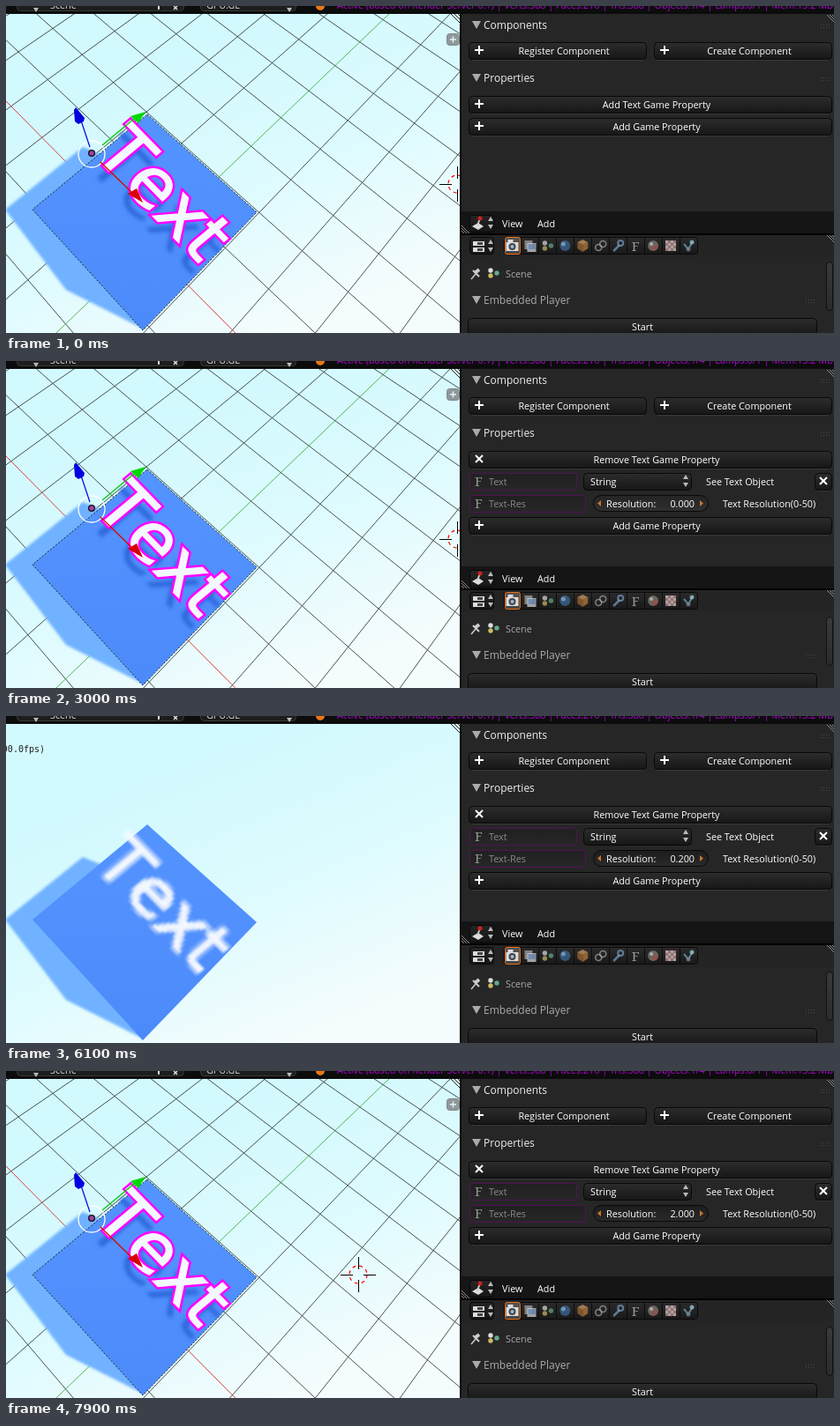
Write an HTML page with a canvas that moves like this. It is 938 by 371 pixels and loops after 8 s.

```html
<!DOCTYPE html>
<html lang="en">
<head>
<meta charset="utf-8">
<title>Text property demo</title>
<style>
html, body { margin: 0; width: 100%; height: 100%; overflow: hidden; background: #111; }
canvas { display: block; }
</style>
</head>
<body>
<canvas id="stage" width="938" height="371"></canvas>
<script>
const ctx = document.getElementById('stage').getContext('2d');
const LOOP = 8000;
const UI = '10.8px "Open Sans", sans-serif';
const TITLE = '12px "Open Sans", sans-serif';
const SERIF = '15px "Noto Serif", serif';
const WORD = 'px "DejaVu Sans", sans-serif';

// Value of the last [time, value] step that has begun.
const stepAt = (steps, t) => steps.reduce((v, [at, next]) => t >= at ? next : v, undefined);

const HOVER = [[0, ''], [400, 'text'], [1200, ''], [2000, 'toggle'], [2700, ''],
  [3000, 'number'], [5500, ''], [7000, 'add'], [7100, 'number'], [7900, '']];
const VALUE = [[0, 0], [3300, 0.1], [3400, 0.3], [3500, 0.6], [3600, 0.9], [3700, 1.1], [3800, 0.8],
  [3900, 0.5], [4000, 0.3], [4100, 0.1], [4200, -0.1], [4300, -0.3], [4500, -0.4], [4700, -0.2],
  [4800, -0.1], [5000, 0.1], [5300, 0.2], [7900, 2]];

// ---------- helpers ----------
function line(color, width, ...p) {
  ctx.strokeStyle = color;
  ctx.lineWidth = width;
  ctx.beginPath();
  for (let i = 0; i < p.length; i += 2) ctx.lineTo(p[i], p[i + 1]);
  ctx.stroke();
}
function poly(color, ...p) {
  ctx.fillStyle = color;
  ctx.beginPath();
  for (let i = 0; i < p.length; i += 2) ctx.lineTo(p[i], p[i + 1]);
  ctx.fill();
}
function rect(color, x, y, w, h) {
  ctx.fillStyle = color;
  ctx.fillRect(x, y, w, h);
}
function disc(color, x, y, r) {
  ctx.fillStyle = color;
  ctx.beginPath();
  ctx.arc(x, y, r, 0, 7);
  ctx.fill();
}
function ring(color, width, x, y, r) {
  ctx.strokeStyle = color;
  ctx.lineWidth = width;
  ctx.beginPath();
  ctx.arc(x, y, r, 0, 7);
  ctx.stroke();
}
function text(s, x, y, color = '#fff', align = 'left', font = UI) {
  ctx.font = font;
  ctx.fillStyle = color;
  ctx.textAlign = align;
  ctx.fillText(s, x, y);
}
function box(x, y, w, h, top, bottom, r = 4, edge = '#080808') {
  const g = ctx.createLinearGradient(0, y, 0, y + h);
  g.addColorStop(0, top);
  g.addColorStop(1, bottom);
  ctx.fillStyle = g;
  ctx.strokeStyle = edge;
  ctx.lineWidth = 1;
  ctx.beginPath();
  ctx.roundRect(x + .5, y + .5, w - 1, h - 1, r);
  ctx.fill();
  ctx.stroke();
}
const plus = (x, y) => { line('#fff', 2, x - 5, y, x + 5, y); line('#fff', 2, x, y - 5, x, y + 5); };
const cross = (x, y) => {
  line('#fff', 2, x - 4, y - 4, x + 4, y + 4);
  line('#fff', 2, x - 4, y + 4, x + 4, y - 4);
};
const arrows = (x, y) => {
  poly('#bbb', x - 3, y - 2, x, y - 7, x + 3, y - 2);
  poly('#bbb', x - 3, y + 2, x, y + 7, x + 3, y + 2);
};

// ---------- 3D view ----------
const ORIGIN = [161, 271], VX = [-1088, -994], VY = [1314, -836];
function ground(x, y) {
  const a = -.0355 * x, b = .0375 * y, w = 1 + a + b;
  return [0, 1].map(i => (ORIGIN[i] + a * VX[i] + b * VY[i]) / w);
}
function grid(thin) {
  const width = thin ? .6 : .85;
  for (let i = -14; i <= 14; i++) {
    if (i <= 8) line(i || thin ? '#2c3436' : '#3aa83a', width, ...ground(i, -6), ...ground(i, 14));
    if (i >= -6) line(i || thin ? '#2c3436' : '#d22', width, ...ground(-14, i), ...ground(8, i));
  }
}

function plane() {
  ctx.filter = 'blur(1.5px)';
  poly('#70b2ff', 87, 160, 160, 190, 155, 366, 68, 322, -1, 231);
  ctx.filter = 'none';
  const g = ctx.createLinearGradient(0, 123, 0, 368);
  g.addColorStop(0, '#5494ff');
  g.addColorStop(1, '#4c8afa');
  poly(g, 160, 123, 284, 234, 155, 368, 30, 231);
}
function onPlane(dx, dy, draw) {
  ctx.save();
  ctx.transform(.7, .72, -.77, .64, 97 + dx, 167 + dy);
  ctx.fontKerning = 'none';
  draw();
  ctx.restore();
}
function sharpWord() {
  ctx.filter = 'blur(2px)';
  onPlane(-8, 13, () => text('Text', 0, 0, '#2f68dc', 'left', 79 + WORD));
  ctx.filter = 'none';
  onPlane(0, 0, () => {
    ctx.font = 79 + WORD;
    ctx.textAlign = 'left';
    ctx.lineJoin = 'miter';
    for (const [color, width] of [['#f0f', 6.5], ['#f4f8ff', 1.5]]) {
      ctx.strokeStyle = color;
      ctx.lineWidth = width;
      ctx.strokeText('Text', 0, 0);
    }
    ctx.fillStyle = '#f4f8ff';
    ctx.fillText('Text', 0, 0);
  });
}
// The word at low resolution, enlarged when it is drawn.
const coarse = document.createElement('canvas');
coarse.width = 50;
coarse.height = 26;
const coarseCtx = coarse.getContext('2d');
coarseCtx.font = 20 + WORD;
coarseCtx.fontKerning = 'none';
coarseCtx.fillStyle = coarseCtx.strokeStyle = '#f4f8ff';
coarseCtx.lineWidth = .8;
coarseCtx.fillText('Text', 1, 20);
coarseCtx.strokeText('Text', 1, 20);
const coarseWord = () => onPlane(0, 0, () => ctx.drawImage(coarse, -4, -79, 197.5, 102.7));

function manipulator(thin) {
  ring('#fff', 1.3, 97, 168, 15);
  line('#00d', 1.2, 95, 160, 85, 130);
  poly('#0000e0', 79, 115, 89, 127, 88, 131, 82, 134, 78, 131, 77, 118);
  line('#0c0', 1.2, 109, 158, 145, 128);
  poly('#00d800', 158, 120, 141, 125, 150, 133);
  if (!thin) line('#d00', 1.2, 107, 177, 142, 211);
  poly('#d80000', 155, 223, 138, 213, 148, 207);
  disc('#111', 97, 167, 4);
  disc('#a040a8', 97, 167, 2.7);
}
function cursor(x, y) {
  ring('#fff', 1.2, x, y, 10);
  ctx.setLineDash([4, 4]);
  ring('#e00', 1.2, x, y, 10);
  ctx.setLineDash([]);
  for (const s of [-1, 1]) {
    line('#000', 1, x + 6 * s, y + .5, x + 20 * s, y + .5);
    line('#000', 1, x + .5, y + 6 * s, x + .5, y + 20 * s);
  }
}
function view(t) {
  const playing = t >= 5900 && t < 6600, thin = t >= 6600 && t < 6800;
  ctx.save();
  ctx.beginPath();
  ctx.rect(0, 9, 514, 362);
  ctx.clip();
  const g = ctx.createLinearGradient(200, 60, 330, 371);
  g.addColorStop(0, '#d2f9fe');
  g.addColorStop(.45, '#dcfbfe');
  g.addColorStop(1, '#f5fcfd');
  rect(g, 0, 9, 514, 362);
  if (!playing) grid(thin);
  plane();
  if (playing) {
    coarseWord();
    text('00.0fps)', 44, 41, '#222', 'right', '10px "DejaVu Sans Mono", monospace');
  } else {
    ctx.setLineDash([2, 2]);
    line('#123', 1, 160, 123, 284, 234, 155, 368, 30, 231, 160, 123);
    ctx.setLineDash([]);
    sharpWord();
    manipulator(thin);
    if (t < 5900) cursor(511, 202); else cursor(399, 231);
    box(499, 31, 15, 14, '#8e989a', '#8e989a', 3, '#808a8c');
    line('#e8f0f0', 1.5, 503, 38, 510, 38);
    line('#e8f0f0', 1.5, 506.5, 34.5, 506.5, 41.5);
  }
  for (let i = 0; i < 3; i++) line('#222', 1, 504 + i * 4, 9, 514, 19 - i * 4);
  ctx.restore();
}

// ---------- panels ----------
function button(label, x, y, w, hot, icon) {
  box(x, y, w, 20, hot ? '#3a3a3a' : '#2d2d2d', hot ? '#272727' : '#161616');
  line('#3a3a3a', 1, x + 4, y + 20.5, x + w - 4, y + 20.5);
  text(label, x + w / 2 + (icon ? 7 : 0), y + 14, '#fff', 'center');
  if (icon) icon(x + 12, y + 9);
}
function heading(label, y, color, grip) {
  poly('#aaa', 528, y - 9, 538, y - 9, 533, y);
  text(label, 541, y, color, 'left', TITLE);
  for (let i = 0; i < 8; i++) rect('#4a4a4a', grip + (i >> 1) * 3, y - 5 + i % 2 * 3, 1, 1);
}
function nameField(label, y, w) {
  box(525, y, w, 20, '#202020', '#272727', 3, '#521256');
  text('F', 531, y + 15, '#959595', 'left', SERIF);
  text(label, 547, y + 14, '#8a8a8a');
}
function numberField(t, hover) {
  if (t >= 7400 && t < 7900) {
    box(665, 152, 131, 19, '#111', '#1b1b1b', 9);
    if (t < 7700) rect('#5b5b5b', 673, 154, 17, 15);
    text(t < 7700 ? '0.2' : '2', 673, 166);
    if (t >= 7700) rect('#5e9fd8', 680, 154, 2, 15);
    return;
  }
  const lit = hover === 'number';
  box(665, 152, 131, 19, lit ? '#242424' : '#1c1c1c', lit ? '#303030' : '#2a2a2a', 9);
  poly('#c8742a', 670, 161.5, 674, 158, 674, 165);
  poly('#c8742a', 790, 161.5, 786, 158, 786, 165);
  text('Resolution:', 680, 166);
  text(stepAt(VALUE, t).toFixed(3), 780, 166, '#fff', 'right');
}
function properties(t) {
  const hover = stepAt(HOVER, t), added = t >= 900, open = t >= 2300;
  heading('Components', 26, '#eee', 923);
  button('Register Component', 524, 41, 202, false, plus);
  button('Create Component', 734, 41, 202, false, plus);
  heading('Properties', 86, '#eee', 923);
  button(added ? 'Remove Text Game Property' : 'Add Text Game Property', 524, 102, 412,
    hover === 'text', added ? cross : plus);
  if (added) {
    nameField('Text', 127, 122);
    box(654, 127, 123, 20, '#2d2d2d', '#161616');
    text('String', 662, 141);
    arrows(770, 136);
    text('See Text Object', 793, 141);
    button('', 916, 127, 20, hover === 'toggle');
    (open ? cross : plus)(926, 136);
  }
  if (open) {
    nameField('Text-Res', 152, 132);
    numberField(t, hover);
    text('Text Resolution(0-50)', 812, 166);
  }
  button('Add Game Property', 524, open ? 177 : added ? 152 : 127, 412, hover === 'add', plus);
}

const bits = (...colors) => (x, y) => colors.forEach((c, i) => disc(c, x - 3 + i % 2 * 7, y - 3 + i * 3, 2.7));
const TABS = [
  (x, y) => { rect('#ddd', x - 7, y - 4, 14, 10); rect('#ddd', x - 5, y - 7, 6, 4); disc('#444', x, y + 1, 4); disc('#9bd', x, y + 1, 2); },
  (x, y) => { rect('#aaa', x - 6, y - 6, 9, 10); rect('#ddd', x - 3, y - 3, 10, 10); rect('#57a', x - 2, y - 2, 8, 6); },
  bits('#ddd', '#6a8', '#cb6'),
  (x, y) => { disc('#3c6c9c', x, y, 6); disc('#8bb0c8', x - 2, y - 2, 2.5); },
  (x, y) => { poly('#d9a060', x, y - 7, x + 6, y - 4, x, y - 1, x - 6, y - 4); poly('#a86a30', x - 6, y - 4, x, y - 1, x, y + 7, x - 6, y + 3); poly('#c08040', x + 6, y - 4, x, y - 1, x, y + 7, x + 6, y + 3); },
  (x, y) => { ring('#aaa', 1.6, x - 2, y + 2, 3.5); ring('#aaa', 1.6, x + 3, y - 2, 3.5); },
  (x, y) => { line('#7aa0c8', 2.5, x - 5, y + 6, x + 2, y - 1); ring('#7aa0c8', 2, x + 3, y - 3, 3); },
  (x, y) => text('F', x, y + 6, '#ccc', 'center', SERIF),
  (x, y) => { disc('#8a8078', x, y, 6); poly('#a44', x, y, x + 6, y, x + 4, y + 4, x, y + 6); disc('#ccc', x - 2, y - 2, 2); },
  (x, y) => { rect('#ddd', x - 6, y - 6, 12, 12); for (let i = 0; i < 16; i++) if ((i + (i >> 2)) % 2) rect('#955', x - 6 + i % 4 * 3, y - 6 + (i >> 2) * 3, 3, 3); },
  (x, y) => { line('#7ab', 2, x - 5, y - 2, x, y + 4, x + 5, y - 5); disc('#9cd', x + 4, y - 4, 2.5); disc('#789', x, y + 4, 2.5); },
];
function tabs() {
  rect('#242424', 516, 260, 422, 25);
  box(525, 262, 28, 20, '#252525', '#161616', 3);
  for (const y of [267, 274]) {
    rect('#ddd', 529, y, 13, 5);
    rect('#444', 534, y + 1, 6, 3);
  }
  arrows(549, 272);
  box(564, 262, 220, 20, '#2b2b2b', '#181818', 3);
  for (let i = 1; i < TABS.length; i++) rect('#0c0c0c', 563 + i * 20, 263, 1, 18);
  box(565, 262, 18, 20, '#555', '#444', 2, '#f07010');
  TABS.forEach((icon, i) => {
    ctx.globalAlpha = i ? .7 : 1;
    icon(573.5 + i * 19.95, 272);
  });
  ctx.globalAlpha = 1;
}
function lowerPanel() {
  rect('#151515', 516, 233, 422, 25);
  rect('#000', 516, 258, 422, 2);
  box(525, 237, 28, 20, '#252525', '#161616', 3);
  poly('#ddd', 528, 250, 535, 246, 541, 250, 535, 254);
  line('#ccc', 2, 534, 249, 537, 241);
  disc('#c22', 537, 241, 2.5);
  arrows(549, 246);
  text('View', 562, 251);
  text('Add', 602, 251);
  tabs();

  line('#ccc', 1.5, 527, 310, 532, 304);
  line('#ccc', 4, 531, 303, 536, 299);
  line('#ccc', 2, 529, 300, 536, 307);
  bits('#ddd', '#6a8', '#cb6')(552, 303);
  text('Scene', 566, 308, '#aaa');
  heading('Embedded Player', 338, '#aaa', 906);
  button('Start', 523, 354, 396);
  box(929, 290, 8, 56, '#3a3a3a', '#2b2b2b', 4, '#111');
}
function topBar() {
  rect('#0c0c0c', 0, 0, 938, 9);
  box(12, -14, 190, 20, '#222', '#1c1c1c', 4, '#3a3a3a');
  arrows(34, 0);
  text('Scene', 50, 3, '#ddd');
  line('#ddd', 2, 173, 0, 173, 4);
  line('#ddd', 1.5, 190, 0, 194, 4);
  line('#ddd', 1.5, 194, 0, 190, 4);
  box(220, -14, 109, 20, '#222', '#1c1c1c', 4, '#3a3a3a');
  text('GPU.GE', 227, 3, '#ddd');
  arrows(321, 0);
  disc('#e87818', 356, 0, 5);
  text('Active (based on Render Server 0.1) | Verts:388 | Faces:216 | Tris:388 | Objects:1/4 | Lamps:0/1 | Mem:13.2 MB', 375, 3, '#b400d8');
}
function panels(t) {
  rect('#262626', 514, 9, 424, 362);
  rect('#0a0a0a', 514, 9, 2, 362);
  properties(t);
  lowerPanel();
  for (let i = 0; i < 3; i++) {
    line('#888', 1, 930 + i * 3, 10, 938, 18 - i * 3);
    line('#888', 1, 930 + i * 3, 260, 938, 268 - i * 3);
    line('#888', 1, 516, 249 + i * 3, 525 - i * 3, 258);
  }
}

function frame() {
  const t = performance.now() % LOOP;
  view(t);
  panels(t);
  topBar();
  requestAnimationFrame(frame);
}
frame();
</script>
</body>
</html>
```
